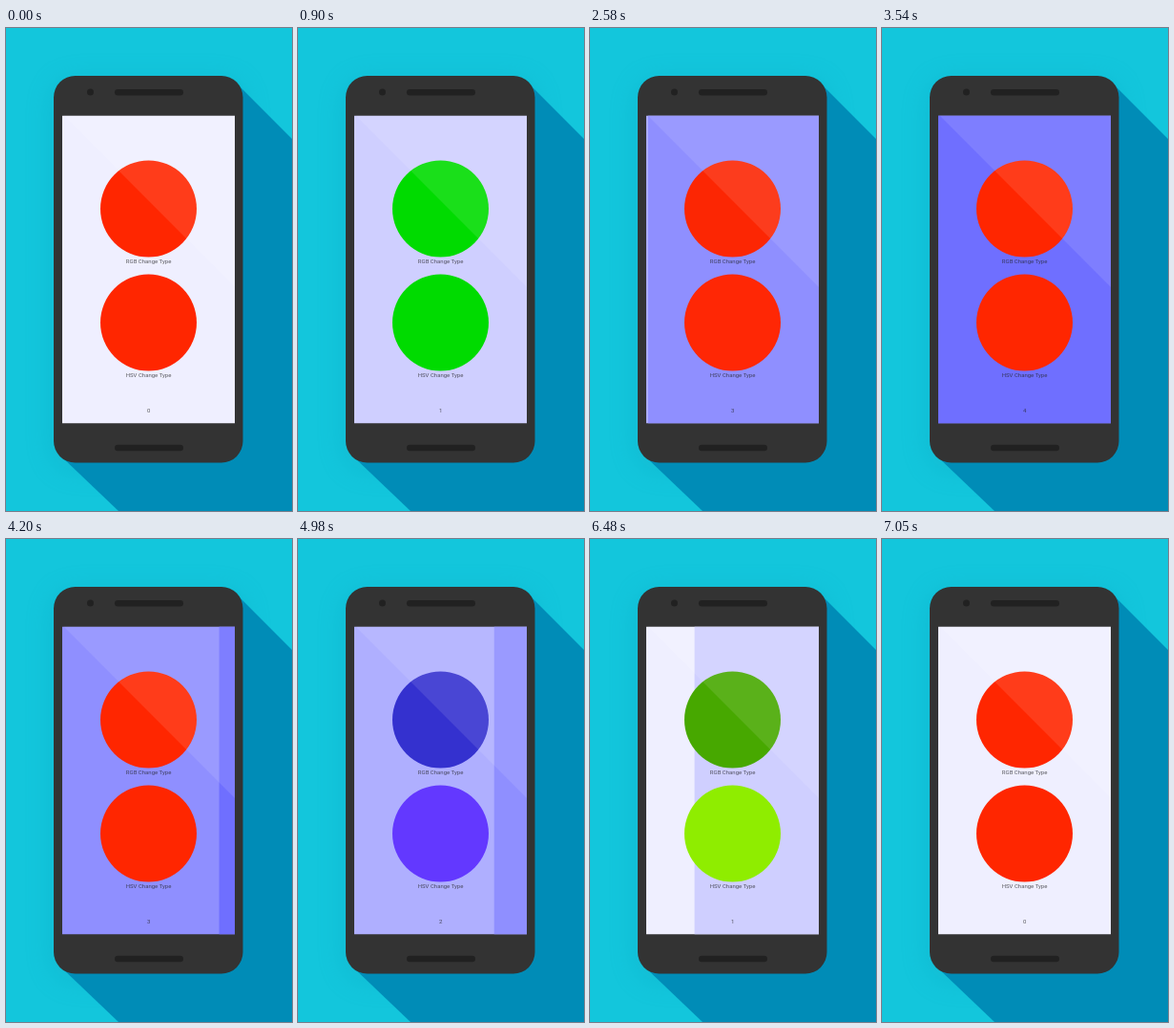
An HTML page that plays this animation: 300 by 505 pixels, repeating every 7110 ms.

```html
<!DOCTYPE html>
<html lang="en">
<head>
<meta charset="utf-8">
<title>Colour pager</title>
<style>
  html, body { margin: 0; width: 100%; height: 100%; overflow: hidden; background: #13c6dc; }
  svg { display: block; width: 300px; height: 505px; }
  text { font: 6px Roboto, Arial, sans-serif; fill: #222; fill-opacity: .72; text-anchor: middle; }
</style>
</head>
<body>
<svg viewBox="0 0 300 505">
  <defs>
    <filter id="soft" x="-30%" y="-20%" width="160%" height="140%"><feGaussianBlur stdDeviation="14"/></filter>
    <clipPath id="screen"><rect x="59" y="91.5" width="181" height="322"/></clipPath>
  </defs>
  <rect width="300" height="505" fill="#13c6dc"/>
  <rect x="48" y="54" width="202" height="408" rx="24" fill="#0794b4" opacity=".25" filter="url(#soft)"/>
  <path d="M241 57L300 116V505H118L57 447Z" fill="#008cb7"/>
  <rect x="50" y="50" width="198.5" height="404.5" rx="22.5" fill="#333"/>
  <g fill="#212121">
    <circle cx="88.5" cy="67" r="3.5"/>
    <rect x="114" y="64" width="72" height="6.5" rx="3.2"/>
    <rect x="114" y="435.7" width="72" height="6.5" rx="3.2"/>
  </g>
  <g clip-path="url(#screen)">
    <rect id="left" x="59" y="91.5" width="181" height="322"/>
    <rect id="right" y="91.5" width="181" height="322"/>
    <circle id="rgb" cx="149.5" cy="189" r="50.5"/>
    <circle id="hsv" cx="149.5" cy="308" r="50.5"/>
    <text x="149.6" y="245.9">RGB Change Type</text>
    <text x="149.6" y="364.9">HSV Change Type</text>
    <text id="page" x="149.6" y="402.2"></text>
    <path d="M59 90H240V271Z" fill="#fff" opacity=".1"/>
  </g>
</svg>
<script>
const LOOP = 7110, WIDTH = 181;
// Each swipe: start, duration, page it leaves, direction.
const swipes = [
  [0, 870, 0, 1], [930, 870, 1, 1], [1860, 850, 2, 1], [2720, 820, 3, 1],
  [3630, 850, 4, -1], [4500, 850, 3, -1], [5450, 850, 2, -1], [6320, 730, 1, -1]
];
const red = [255, 38, 0], yellow = [255, 251, 0], green = [0, 219, 0],
      cyan = [0, 253, 255], blue = [4, 51, 255], magenta = [255, 64, 255];
const rgbStops = [red, green, blue, red, red];
const hsvStops = [red, yellow, green, cyan, blue, magenta, red, red, red];
const el = id => document.getElementById(id);
const [left, right, rgb, hsv, page] = ['left', 'right', 'rgb', 'hsv', 'page'].map(el);

const ease = u => 1 - (1 - u ** 1.5) ** 3;

function position(t) {
  const [start, span, from, dir] = swipes.findLast(s => t >= s[0]);
  return from + dir * ease(Math.min(1, (t - start) / span));
}

function blend(stops, x) {
  const i = Math.min(Math.floor(x), stops.length - 2);
  return `rgb(${stops[i].map((c, k) => Math.round(c + (stops[i + 1][k] - c) * (x - i)))})`;
}

function pageColor(i) {
  const c = 239 - 32 * i;
  return `rgb(${c},${c},255)`;
}

function draw(now) {
  const pos = position(now % LOOP), i = Math.min(3, Math.floor(pos));
  left.setAttribute('fill', pageColor(i));
  right.setAttribute('fill', pageColor(i + 1));
  right.setAttribute('x', 59 + (i + 1 - pos) * WIDTH);
  rgb.setAttribute('fill', blend(rgbStops, pos));
  hsv.setAttribute('fill', blend(hsvStops, pos * 2));
  page.textContent = Math.round(pos);
}

const begin = performance.now();
function tick() {
  draw(performance.now() - begin);
  requestAnimationFrame(tick);
}
tick();
</script>
</body>
</html>
```
